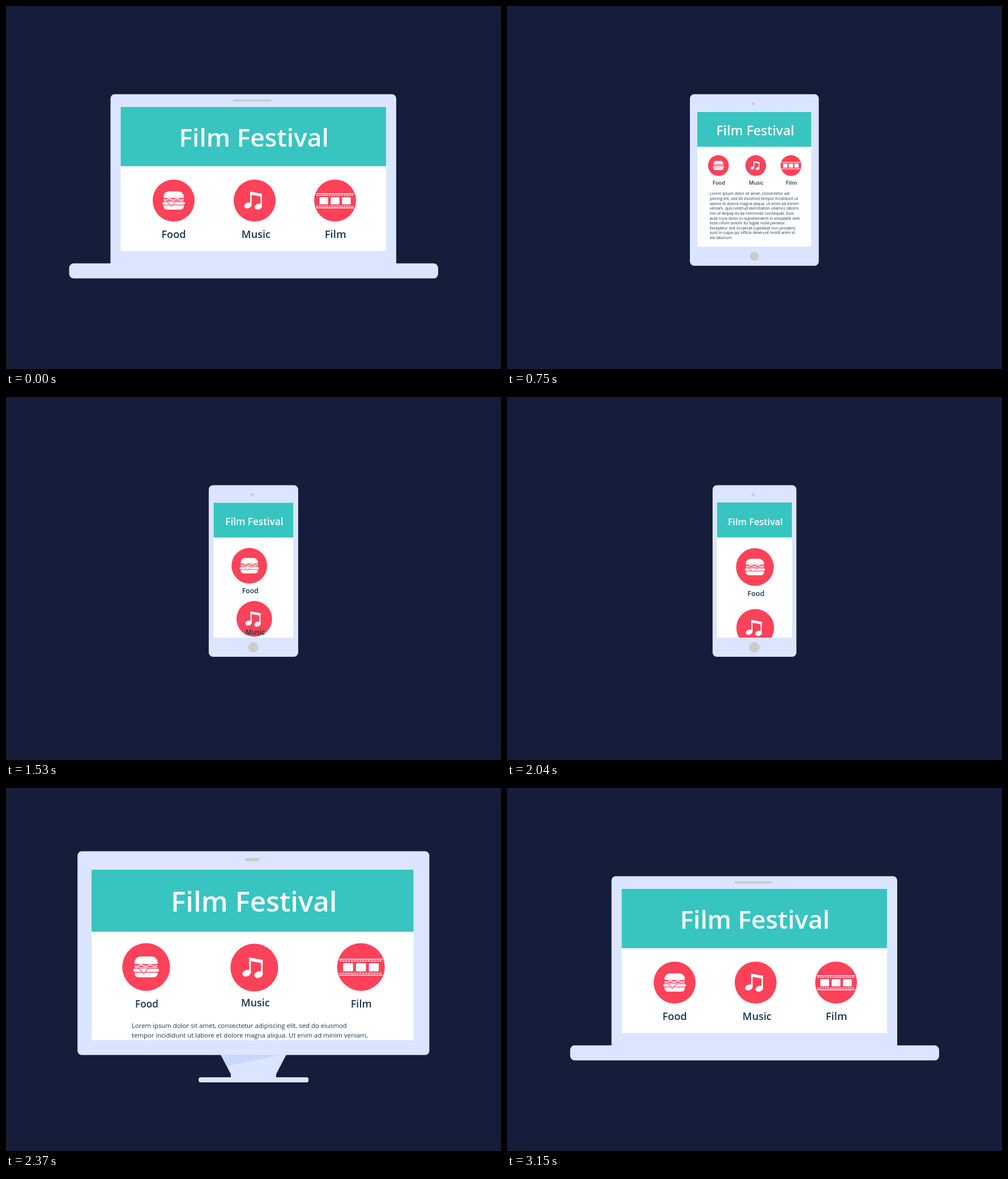
An HTML page with a canvas for the animation above (3.18 s loop, 874x640 px).

```html
<!DOCTYPE html>
<html lang="en">
<head>
<meta charset="utf-8">
<title>Responsive page</title>
<style>
  html, body { margin: 0; width: 100%; height: 100%; overflow: hidden; background: #161d3a; }
  canvas { display: block; }
</style>
</head>
<body>
<canvas id="stage" width="874" height="640"></canvas>
<script>
const ctx = document.getElementById('stage').getContext('2d');
const LOOP = 3180;
const NIGHT = '#161d3a', SHELL = '#dbe5ff', SHADE = '#c9d7fa', TEAL = '#38c4c0';
const RED = '#fd4259', INK = '#183650', GREY = '#cccccc', WHITE = '#ffffff';
const FONT = '"Open Sans", "Noto Sans", sans-serif';

const COLUMN = [
  'Lorem ipsum dolor sit amet, consectetur adi',
  'piscing elit, sed do eiusmod tempor incididunt ut',
  'labore et dolore magna aliqua. Ut enim ad minim',
  'veniam, quis nostrud exercitation ullamco laboris',
  'nisi ut aliquip ex ea commodo consequat. Duis',
  'aute irure dolor in reprehenderit in voluptate velit',
  'esse cillum dolore eu fugiat nulla pariatur.',
  'Excepteur sint occaecat cupidatat non proident,',
  'sunt in culpa qui officia deserunt mollit anim id',
  'est laborum.'
];
const WIDE = [
  'Lorem ipsum dolor sit amet, consectetur adipiscing elit, sed do eiusmod',
  'tempor incididunt ut labore et dolore magna aliqua. Ut enim ad minim veniam,'
];

// Boxes are left, top, right, bottom. Texts are x, baseline, size. Icons are x, y, radius.
// Sizes below zero are not drawn, so a part can vanish partway through a move.
const laptop = {
  body: [184.5, 155.5, 689, 461], screen: [202.5, 178, 671, 432], header: [178, 282.5],
  base: [111.5, 453.8, 763, 480.3], stand: [419],
  camera: [401, 164.5, 469, 168.5], home: [436.8, 441.3, 0],
  title: [437.7, 248, 44.3],
  food: [296, 343, 37], music: [439, 343, 37], film: [581, 343, 37],
  foodLabel: [296, 409, 18.2], musicLabel: [441.5, 409, 18.2], filmLabel: [581.7, 408.7, 18.6],
  column: [437, 411, -1], wide: [222, 446]
};
const tablet = {
  body: [323, 155.5, 550.5, 458], screen: [336, 187, 537, 424.3], header: [187, 248.2],
  base: [340, 425, 534, 451], stand: [430],
  camera: [432, 169.5, 437.6, 175.1], home: [436.8, 441.3, 8],
  title: [438.4, 228, 23.1],
  food: [373.3, 281.3, 18.3], music: [439.2, 281.3, 18.3], film: [501.3, 281.3, 18.3],
  foodLabel: [374, 314.5, 9.2], musicLabel: [440, 314.5, 9.2], filmLabel: [502, 314.7, 9.5],
  column: [358, 411, 6.87], wide: [222, 469]
};
const phone = {
  body: [363, 155.5, 511, 458], screen: [371, 186, 503, 424.3], header: [186, 247.6],
  base: [380, 425, 494, 451], stand: [434],
  camera: [432, 169.5, 437.6, 175.1], home: [436.8, 441.3, 9.2],
  title: [438.5, 226, 16.3],
  food: [437.7, 299.8, 33.3], music: [438.3, 407, 33.3], film: [435, 508, 33.3],
  foodLabel: [439.5, 351, 12.7], musicLabel: [440, 434, 12.7], filmLabel: [432, 543, 12.7],
  column: [446, 419, -1], wide: [222, 469]
};
const desktop = {
  body: [126.2, 111.5, 747.5, 470.7], screen: [151.1, 143.7, 719.6, 444.6], header: [143.7, 253.4],
  base: [215, 440, 659, 466], stand: [519],
  camera: [422.1, 123.3, 447.3, 129.3], home: [436.8, 441.3, -6],
  title: [437.8, 218.3, 49.2],
  food: [247.4, 315.6, 42.1], music: [438.4, 316.7, 42.1], film: [626.7, 315.6, 42.1],
  foodLabel: [248.6, 387, 17.3], musicLabel: [440.4, 384.5, 18], filmLabel: [627.2, 387, 18],
  column: [437, 411, -1], wide: [222, 422.5]
};
const SCROLL = 160;
const scrolled = {
  ...phone, header: phone.header.map(y => y - SCROLL), title: [438.5, 226 - SCROLL, 16.3]
};
for (const [name, drop] of [['food', 51], ['music', 51], ['film', 51]]) {
  const [x, y, r] = phone[name];
  scrolled[name] = [x, y - SCROLL, r];
  scrolled[name + 'Label'] = [phone[name + 'Label'][0], y - SCROLL + drop, 12.7];
}
const phoneLeaving = { ...phone, filmLabel: [423, 503, -14] };

const MOVES = [
  { at: 540, gap: 30, steps: 8, from: laptop, to: tablet },
  { at: 1350, gap: 30, steps: 8, from: tablet, to: phone },
  { at: 1590, gap: 75, steps: 3, from: phone, to: scrolled },
  { at: 1890, gap: 75, steps: 3, from: scrolled, to: phone },
  { at: 2160, gap: 30, steps: 8, from: phoneLeaving, to: desktop },
  { at: 2940, gap: 30, steps: 8, from: desktop, to: laptop }
];

function poseAt(time) {
  const move = MOVES.filter(m => m.at <= time).pop();
  if (!move) return laptop;
  const { at, gap, steps, from, to } = move;
  const k = Math.min(1, (Math.floor((time - at) / gap) + 1) / steps);
  return Object.fromEntries(Object.entries(from).map(([key, values]) =>
    [key, values.map((v, i) => v + (to[key][i] - v) * k)]));
}

function box([left, top, right, bottom], color, radius = 0) {
  ctx.fillStyle = color;
  ctx.beginPath();
  ctx.roundRect(left, top, right - left, bottom - top, radius);
  ctx.fill();
}

function disc([x, y, r], color) {
  if (r <= 0) return;
  ctx.fillStyle = color;
  ctx.beginPath();
  ctx.arc(x, y, r, 0, Math.PI * 2);
  ctx.fill();
}

function shape(points, color) {
  ctx.fillStyle = color;
  ctx.beginPath();
  points.forEach(([x, y]) => ctx.lineTo(x, y));
  ctx.closePath();
  ctx.fill();
}

function line(points, color, width) {
  ctx.strokeStyle = color;
  ctx.lineWidth = width;
  ctx.beginPath();
  points.forEach(([x, y]) => ctx.lineTo(x, y));
  ctx.stroke();
}

function write(text, [x, y, size], color, weight = 600, align = 'center') {
  if (size <= 0) return;
  ctx.font = `${weight} ${size}px ${FONT}`;
  ctx.textAlign = align;
  ctx.fillStyle = color;
  ctx.fillText(text, x, y);
}

// Icons are drawn around the origin in a circle of radius 37.
function burger() {
  box([-18, -16.3, 18, -4.5], WHITE, [10, 10, 2, 2]);
  const wave = Array.from({ length: 37 }, (_, i) => [i - 18, -2 + 0.9 * Math.sin(i / 2.2)]);
  line(wave, WHITE, 1.6);
  line([[-18, 0.9], [18, 0.9]], WHITE, 1);
  box([-18, 8.6, 18, 16], WHITE, [1, 1, 6, 6]);
  box([-20, 2.7, 20, 7.3], WHITE, 2.3);
  const cheese = [[-11, 2.5], [-4, 10.2], [3, 2.5]];
  shape(cheese, WHITE);
  line(cheese, RED, 1.1);
}

function notes() {
  shape([[-8, -15.7], [13, -12], [13, -6.8], [-8, -10.5]], WHITE);
  box([-8, -15, -5.4, 9], WHITE);
  box([10.4, -11, 13, 11], WHITE);
  ctx.fillStyle = WHITE;
  for (const [x, y] of [[-12, 8.6], [6.6, 10.8]]) {
    ctx.beginPath();
    ctx.ellipse(x, y, 6.8, 5, -0.35, 0, Math.PI * 2);
    ctx.fill();
  }
}

function filmStrip() {
  for (const x of [-20, 0, 20]) box([x - 7.7, -6, x + 7.7, 6.8], WHITE, 1.5);
  for (const y of [-12, 12.7]) line([[-33.5, y], [33.5, y]], WHITE, 1.4);
  ctx.setLineDash([3, 1.4]);
  for (const y of [-9.2, 9.7]) line([[-33, y], [33, y]], WHITE, 1.5);
  ctx.setLineDash([]);
}

function icon([x, y, r], drawing) {
  disc([x, y, r], RED);
  ctx.save();
  ctx.translate(x, y);
  ctx.scale(r / 37, r / 37);
  drawing();
  ctx.restore();
}

function drawStand(bottom) {
  const middle = 437, neck = bottom - 14.5, top = bottom - 56;
  shape([[middle - 61.6, top], [middle - 40, neck], [middle - 40, bottom - 8],
    [middle + 40, bottom - 8], [middle + 40, neck], [middle + 61.6, top]], SHELL);
  shape([[middle - 61.6, top], [middle - 47.3, bottom - 28.5], [middle + 53, bottom - 49.5],
    [middle + 53, top]], SHADE);
  box([340, bottom - 9, 534.3, bottom], SHELL, 4);
}

function drawPage(p) {
  const [, top, , bottom] = p.screen;
  box(p.screen, WHITE);
  ctx.save();
  ctx.beginPath();
  ctx.rect(p.body[0], top, p.body[2] - p.body[0], bottom - top);
  ctx.clip();
  box([p.screen[0], p.header[0], p.screen[2], p.header[1]], TEAL);
  write('Film Festival', p.title, WHITE);

  icon(p.food, burger);
  icon(p.music, notes);
  icon(p.film, filmStrip);

  const [x, last, size] = p.column;
  COLUMN.forEach((text, i) => {
    const y = last - (COLUMN.length - 1 - i) * size * 1.255;
    write(text, [x, y, size], INK, 400, 'left');
  });
  if (p.column[2] <= 0) {
    WIDE.forEach((text, i) => write(text, [p.wide[0], p.wide[1] + i * 17, 11.36], INK, 400, 'left'));
  }
  write('Food', p.foodLabel, INK);
  write('Music', p.musicLabel, INK);
  write('Film', p.filmLabel, INK);
  ctx.restore();
}

function draw(now) {
  const p = poseAt(now % LOOP);
  box([0, 0, 874, 640], NIGHT);
  if (p.stand[0] > p.body[3]) drawStand(p.stand[0]);
  box(p.base, SHELL, 8);
  box(p.body, SHELL, 7.5);
  drawPage(p);
  box(p.camera, GREY, 3);
  disc(p.home, GREY);
  requestAnimationFrame(draw);
}
draw(performance.now());
</script>
</body>
</html>
```
